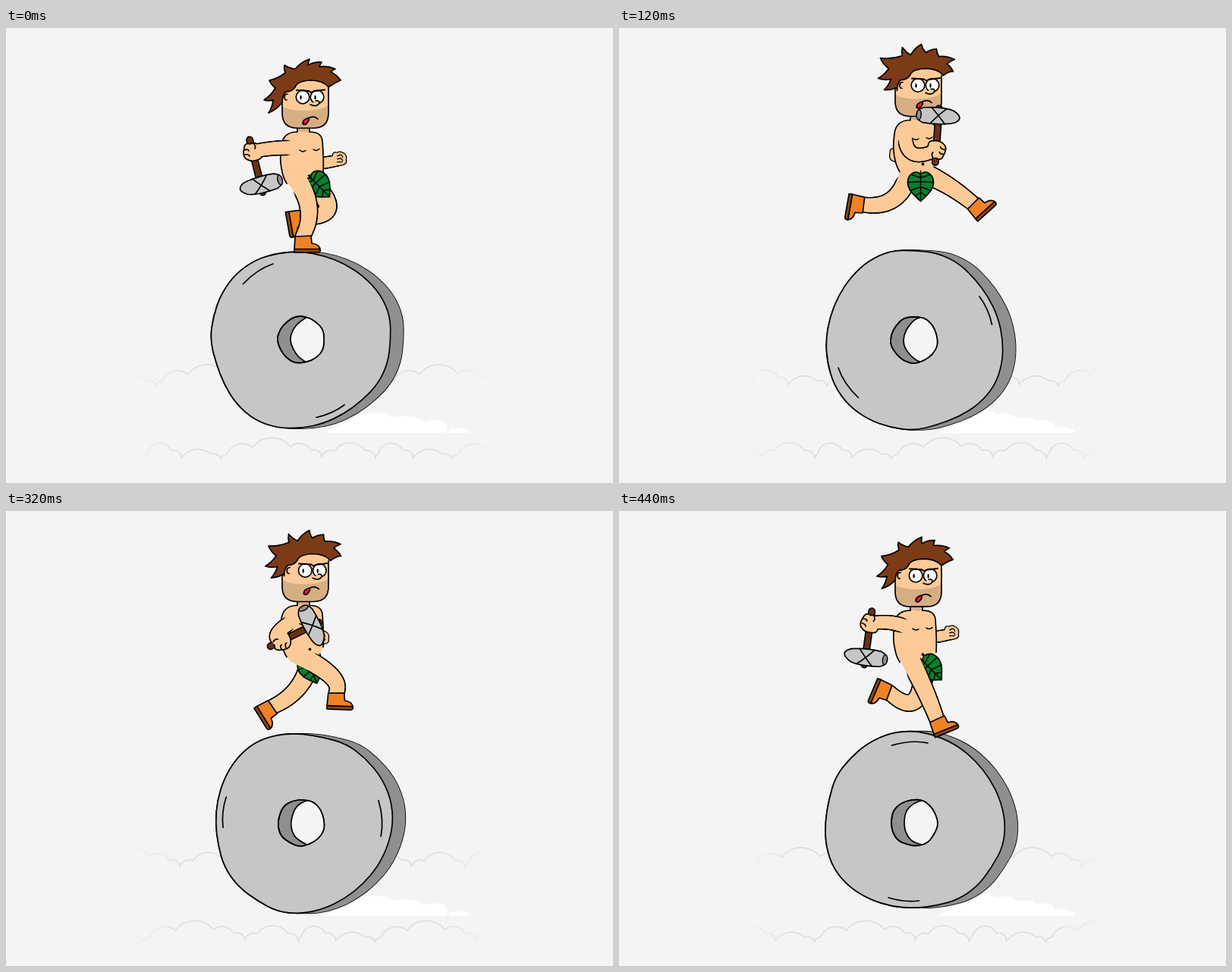
Animation, 800 px wide and 600 px high, one loop 480 ms. Source, as an HTML page:

```html
<!DOCTYPE html>
<html lang="en">
<head>
<meta charset="utf-8">
<title>Stone wheel runner</title>
<style>
html, body { margin: 0; width: 100%; height: 100%; overflow: hidden; background: #f4f4f4; }
svg { display: block; width: 100%; height: 100%; }
</style>
</head>
<body>
<svg viewBox="0 0 800 600" stroke-linejoin="round" stroke-linecap="round">
  <defs>
    <linearGradient id="fade" gradientUnits="userSpaceOnUse" x1="163" x2="642" y1="0" y2="0">
      <stop offset="0" stop-color="#000"/>
      <stop offset=".15" stop-color="#fff"/>
      <stop offset=".85" stop-color="#fff"/>
      <stop offset="1" stop-color="#000"/>
    </linearGradient>
    <mask id="edge" maskUnits="userSpaceOnUse" x="0" y="0" width="800" height="600">
      <rect width="800" height="600" fill="url(#fade)"/>
    </mask>
  </defs>
  <g id="scene"></g>
</svg>
<script>
const STEP = 40, COUNT = 12, LINE = 1.7;
const SKIN = '#fbca97', SHADE = '#d6ae84', STONE = '#c6c6c6', DARK = '#8f8f8f', PAPER = '#f4f4f4';
const HAIR = '#7c3b17', WOOD = '#6b3211', BOOT = '#ee8224', SOLE = '#8f4713', LEAF = '#07802b';
const scene = document.getElementById('scene');

const path = (d, fill = 'none', stroke = '#000', w = LINE) =>
  `<path d="${d}" fill="${fill}" stroke="${stroke}" stroke-width="${w}"/>`;
const move = (x, y, body, rot = 0, scale = 1) =>
  `<g transform="translate(${x} ${y}) rotate(${rot}) scale(${scale})">${body}</g>`;
const mix = (a, b, k) => a + (b - a) * k;

// A track holds the value at step 0, then at steps 1, 3, 5, 7, 9, 11.
function at(v, i) {
  if (i === 0) return v[0];
  const odd = k => v[1 + (k + 6) % 6];
  if (i % 2) return odd((i - 1) / 2);
  const k = i / 2;
  return (9 * (odd(k - 1) + odd(k)) - odd(k - 2) - odd(k + 1)) / 16;
}
const point = (track, i) => [at(track.x, i), at(track.y, i)];

// ---- clouds ----
const CLOUD = 'M0 568A9 9 0 0 1 8 562A22 22 0 0 1 42 553A32 32 0 0 1 92 552A18 18 0 0 1 119 557' +
  'A10 10 0 0 1 133 566A12 12 0 0 1 150 558A24 24 0 0 1 190 557A12 12 0 0 1 204 568' +
  'A8 8 0 0 1 208 561A17 17 0 0 1 240 557A10 10 0 0 1 253 567A8 8 0 0 1 257 563' +
  'A25 25 0 0 1 292 562A10 10 0 0 1 305 568';

function clouds(i) {
  let out = '';
  for (const [x, y] of [[198, -96.5], [283, 0]])
    for (let k = -2; k < 2; k++)
      out += move(x + 305 * (k + i / COUNT), y, path(CLOUD, 'none', '#dedede'));
  return `<g mask="url(#edge)">${out}</g>`;
}

// ---- wheel ----
const RIM = [117, 117.5, 116, 112.5, 112, 113.5, 116, 119.5, 121.5, 119.5, 116.5, 115.5,
  119, 119, 120.5, 121.5, 120.5, 117.5, 115.5, 114, 114.5, 116.5, 119.5, 120.5].map(r => r * 1.008);
const HOLE = Array.from({ length: 14 }, (_, k) => 31.3 + 0.8 * ((k * 5) % 3 - 1));

function ring(radii, turn) {
  const n = radii.length;
  const p = radii.map((r, k) => {
    const a = k / n * 2 * Math.PI + turn;
    return [389 + r * Math.cos(a), 411 + r * Math.sin(a)];
  });
  const mid = k => {
    const a = p[k % n], b = p[(k + 1) % n];
    return `${(a[0] + b[0]) / 2} ${(a[1] + b[1]) / 2}`;
  };
  return 'M' + mid(n - 1) + p.map((q, k) => `Q${q[0]} ${q[1]} ${mid(k)}`).join('') + 'Z';
}

function wheel(i) {
  const turn = -i * Math.PI / 6, rim = ring(RIM, turn), hole = ring(HOLE, turn);
  const depth = [0, 4, 8.5, 13, 17];
  const marks = path('M312.5 337.5Q331 318 352 311M409 513.5Q430 509 446 497');
  return depth.map(x => move(x, 0, path(rim))).join('') +
    depth.map(x => move(x, 0, path(rim, DARK, 'none'))).join('') +
    path(rim, STONE) +
    `<g transform="rotate(${-30 * i} 389 411)">${marks}</g>` +
    `<clipPath id="bore"><path d="${hole}"/></clipPath>` +
    path(hole, DARK) +
    `<g clip-path="url(#bore)">${move(17, 0, path(hole, PAPER))}</g>` + path(hole);
}

// ---- dust ----
const PUFF = [
  'M420 534L465 510C480 506 505 506 510 514C525 510 548 512 551 520C562 515 581 517 581 524Q583 531 580 534Z',
  'M426 534C430 526 440 520 452 516L470 514C485 508 508 507 513 515C525 512 535 516 540 517' +
    'C550 515 560 517 556 522L552 524C565 524 578 516 588 521C592 524 585 527 578 529C588 526 592 530 588 534Z',
  'M420 534L472 508C480 503 495 504 497 510C508 506 522 510 523 515C535 511 548 515 549 518' +
    'C560 515 576 520 574 525C585 525 600 527 601 533L598 534Z'
];
const lump = (x, w, h) => path(`M${x - w} 534Q${x - w} ${534 - h} ${x - w / 3} ${535 - h}Q${x + w} ${533 - h} ${x + w} 534Z`, '#fff', 'none');

function dust(i) {
  const k = i % 4;
  const bit = [[597, 14, 7], [611, 9, 6], [624, 5, 4], [636, 2, 2]][k];
  return path(PUFF[Math.min(k, 2)], '#fff', 'none') + lump(...bit) +
    (k === 3 ? '<circle cx="605" cy="525" r="1.2" fill="#fff"/>' : '');
}

// ---- limbs ----
// Tapered tube through three joints; the outline starts at "open" so it can merge with the body.
function limb([a, b, c], r0, r1, open) {
  const n = 24, ctl = [0, 1].map(k => 2 * b[k] - (a[k] + c[k]) / 2);
  const pos = t => [0, 1].map(k =>
    ((1 - t) * (1 - t) * a[k] + 2 * t * (1 - t) * ctl[k] + t * t * c[k]).toFixed(2)).join(' ');
  const tube = (color, extra, from) => {
    let out = '';
    for (let k = Math.round(from * n); k < n; k++)
      out += path(`M${pos(k / n)}L${pos((k + 1) / n)}`, 'none', color, 2 * mix(r0, r1, k / n) + extra);
    return out;
  };
  return { edge: tube('#000', LINE, open), skin: tube(SKIN, -LINE, 0) };
}

const NEAR = {
  knee: { x: [399, 372, 362, 377, 420, 428, 404], y: [238, 240, 225, 238, 231, 208, 238] },
  foot: { x: [391, 357, 322, 347, 401, 457, 419], y: [275, 270, 233, 223, 245, 238, 275] },
  turn: [0, 28, 100, 122, 60, -45, -22]
};
const FAR = {
  knee: { x: [424, 428, 434, 412, 395, 378, 390], y: [238, 226, 208, 235, 232, 236, 250] },
  foot: { x: [391, 413, 467, 432, 377, 334, 356], y: [250, 247, 232, 272, 270, 246, 239] },
  turn: [80, 55, -42, -30, 28, 85, 113]
};

const boot = path('M-10 0L11 -1L12 9Q22 10 23 17H-11Z', BOOT) +
  path('M-11 16.5H23Q24 21 20 21H-11Z', SOLE);

function leg(track, hip, i, open) {
  const foot = point(track.foot, i);
  const l = limb([hip, point(track.knee, i), foot], 13, 9.6, open);
  return l.edge + l.skin + move(...foot, boot, at(track.turn, i));
}

const ARM = {
  elbow: { x: [350, 357, 388, 390, 370, 348, 355], y: [159, 170, 166, 172, 178, 146, 147] },
  hand: { x: [325, 364, 418, 413, 393, 335, 331], y: [163, 188, 161, 162, 176, 163, 148] },
  tool: [76, -9, -86, -112, -86, 38, 98]
};
const FIST = { x: [439, 429, 366, 361, 392, 436, 438], y: [172, 177, 167, 145, 172, 158, 160] };

const fist = path('M-11 -6Q-10 -12 -3 -10Q2 -13 8 -9Q14 -5 12 3Q14 9 6 11Q-2 14 -8 10Q-14 7 -11 -6Z', SKIN);
const curl = path('M-3 -4Q5 -9 6 -2M-3 1Q5 -2 6 4M-3 6H5');

const hammer = path('M-16 0H55', 'none', '#000', 10) + path('M-16 0H55', 'none', WOOD, 6.8) +
  path('M35 -20Q38 -29 45 -29Q52 -29 55 -20Q58 8 53 20Q48 28 44 28Q38 27 36 16Q33 -4 35 -20Z', STONE) +
  '<ellipse cx="45" cy="-26" rx="6.5" ry="3" fill="#8f8f8f" stroke="#000" stroke-width="1.5"/>' +
  path('M35 -10Q47 0 55 10M56 -10Q46 0 35 9');

function farArm(i) {
  const [x, y] = point(FIST, i);
  const start = [395, y + 7];
  const l = limb([start, [(395 + x) / 2, y + 6], [x, y + 2]], 8, 7, 0);
  return l.edge + move(x, y, fist, 0, 0.78) + l.skin + move(x, y, curl, 0, 0.78);
}

function nearArm(i, dy) {
  const hand = point(ARM.hand, i), turn = at(ARM.tool, i);
  const l = limb([[377, 158 + dy], point(ARM.elbow, i), hand], 9.5, 8.5, 0.13);
  return l.edge + move(...hand, hammer, turn) + move(...hand, fist, turn - 76) + l.skin +
    move(...hand, path('M-11 -2Q-6 -4 -5 -1M-10 4Q-5 3 -4 6M1 -11Q5 -7 3 -4'), turn - 76);
}

// ---- body ----
const LEFT = 'M384 137Q365 137 363 155Q360 175 364 190Q366 199 370 205';
const RIGHT = 'M400 137Q416 137 417 149Q419 175 418 192';
const trunk = path('M384 137Q365 137 363 155Q360 175 364 190Q366 199 370 205Q392 222 410 207' +
  'L418 192Q419 175 417 149Q416 137 400 137Z', SKIN, 'none') + path(RIGHT) +
  path('M387 161Q391 164.500 395 161.500M405 160Q409 163 413 159.500', 'none', '#000', 1.5) +
  '<circle cx="400.500" cy="195" r="1.900"/>' + path('M392 201Q394 204 394 207', 'none', '#000', 1.4);
const neck = path('M384.500 130H399.500V141H384.500Z', SKIN, 'none') +
  path('M384.500 130H399.500V136Q392 139 384.500 135Z', SHADE, 'none') +
  path('M384 130V137M400 130V137');

const leafShape = path('M0 -15C-4 -22 -17 -18 -17 -5C-17 6 -6 14 0 20C6 14 17 6 17 -5C17 -18 4 -22 0 -15Z', LEAF) +
  path('M0 -20V19M0 -11L-12 -15M0 -11L12 -15M0 -6L-16 -5M0 -6L16 -5M0 1L-14 6M0 1L14 6M0 8L-7 13M0 8L7 13', 'none', '#000', 1.5);
function leaf(i) {
  return move(at([412.5, 406, 397.5, 406.5, 410, 397, 411], i), 208.5, leafShape,
    at([-45, -45, 0, -45, -45, 0, -45], i));
}

// ---- head ----
const HAIR_DOWN = [364, 98, 346, 112, 352, 95, 340, 95, 355, 79, 347, 69, 368, 59, 367, 49,
  381, 54, 400, 41, 398, 49, 416, 45, 413, 51, 434, 54, 428, 58, 441, 69];
const HAIR_UP = [364, 94, 347, 97, 356, 83, 339, 82, 353, 69, 342, 55, 371, 52, 371, 41,
  382, 51, 396, 37, 402, 48, 416, 43, 419, 53, 440, 57, 430, 63, 438, 73];

function hair(lift) {
  const v = HAIR_DOWN.map((a, k) => mix(a, HAIR_UP[k], lift));
  let d = `M${v[0]} ${v[1]}`;
  for (let k = 2; k < v.length; k += 2) {
    const dx = v[k] - v[k - 2], dy = v[k + 1] - v[k - 1];
    const bend = k % 4 ? 0.14 : -0.12;
    d += `Q${v[k] - dx / 2 + dy * bend} ${v[k + 1] - dy / 2 - dx * bend} ${v[k]} ${v[k + 1]}`;
  }
  return path(d + 'Q433 72 425 78Q418 69 400 69Q384 70 381 78Q377 84 369 84Q364 88 364 98Z', HAIR);
}

const JAW = 'V112Q425 132 405 132H384Q364 132 364 112';
const eye = x => `<circle cx="${x}" cy="91" r="8.800" fill="#fff" stroke="#000" stroke-width="${LINE}"/>` +
  `<ellipse cx="${x - 2.5}" cy="91.500" rx="1.200" ry="3"/>`;
const features = path('M371 87Q367 87 367 91Q367 95 370 95') + eye(391) + eye(410) +
  path('M401 101Q409 105 413 99Q413 95 408 96', SKIN) +
  path('M383 82L399 83L402 85L405 83.500L420 81.500', 'none', '#000', 1.9);
const mouth = path('M391 126Q391 120 399 118.500Q400 123 395 127Q392 128 391 126Z', '#e3184a') +
  path('M398 119Q406 115 411 120');

function head(i, lift) {
  const fx = 2.5 - 2.5 * Math.cos((i + 0.4) * Math.PI / 6);
  return path(`M425 78${JAW}V84L372 74L400 67Q419 68 425 78Z`, SKIN, 'none') +
    path(`M364 103Q372 109 395 109Q418 108 425 101${JAW}Z`, SHADE, 'none') +
    path(`M425 78${JAW}V84`) +
    move(fx, 0, features) + move(fx * 0.4, -6 * lift, mouth) + move(fx * 0.8, 0, hair(lift));
}

function runner(i) {
  const s = Math.abs(Math.sin(i * Math.PI / 6)), lift = s * s;
  const dy = -15.5 * (s + lift) / 2;
  const near = leg(NEAR, [383, 199 + dy * 0.8], i, 0.2);
  const cover = leaf(i);
  const front = at(NEAR.knee.x, i) < 385;
  return farArm(i) + leg(FAR, [402, 204 + dy * 0.8], i, 0) + move(0, dy, trunk) +
    (front ? near + cover : cover + near) +
    move(0, dy, path(LEFT) + neck + head(i, lift)) + nearArm(i, dy);
}

let shown = -1;
function draw(now) {
  const i = Math.floor(now / STEP) % COUNT;
  if (i !== shown) {
    shown = i;
    const inFront = i % 4 === 1;
    scene.innerHTML = clouds(i) + (inFront ? '' : dust(i)) + wheel(i) + (inFront ? dust(i) : '') + runner(i);
  }
}

let start = null;
function tick(now) {
  if (start === null) start = now;
  draw(now - start);
  requestAnimationFrame(tick);
}
draw(0);
requestAnimationFrame(tick);
</script>
</body>
</html>
```
